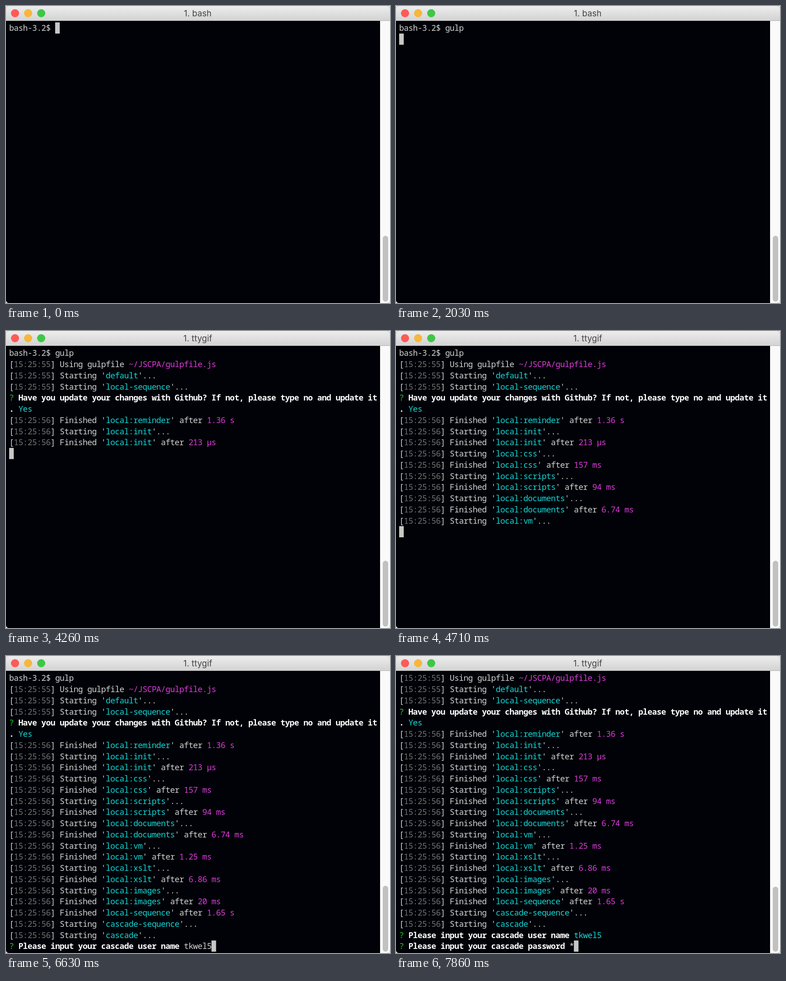
An HTML page with a canvas that plays this animation: 851 px wide and 658 px high, repeating every 8 s.

```html
<!DOCTYPE html>
<html lang="en">
<head>
<meta charset="utf-8">
<title>Terminal</title>
<style>
html, body { margin: 0; width: 100%; height: 100%; overflow: hidden; background: #fff; }
canvas { display: block; }
</style>
</head>
<body>
<canvas id="stage" width="851" height="658"></canvas>
<script>
const ctx = document.getElementById('stage').getContext('2d');
const W = 851, H = 658, LOOP = 8000;
const CELL = 10.19, ROW = 24.75, LEFT = 7, TOP = 36.3, ROWS = 25;
const FG = '#d2d2d2', GREY = '#727272', CYAN = '#14d6d6', PINK = '#dc3cda', GREEN = '#1ccb1c', WHITE = '#fff';
const SIZE = 18;
const MONO = SIZE + 'px "Noto Sans Mono", "DejaVu Sans Mono", monospace';
const TRACKING = CELL - 0.6 * SIZE + 'px';

// A line is a list of [text, colour] runs; white runs are bold.
const stamp = sec => [['[', FG], ['15:25:' + sec, GREY], ['] ', FG]];
const start = (task, sec = 56) =>
  [...stamp(sec), ["Starting '", FG], [task, CYAN], ["'...", FG]];
const finish = (task, time) =>
  [...stamp(56), ["Finished '", FG], [task, CYAN], ["' after ", FG], [time, PINK]];
const ask = text => [['? ', GREEN], [text + ' ', WHITE]];

const command = 'gulp', keyTimes = [810, 920, 1490, 1660];
const user = 'tkwel5', userTimes = [5940, 6040, 6130, 6230, 6390, 6630];
const typed = (text, times, t) => text.slice(0, times.filter(at => at <= t).length);

const question = ask('Have you update your changes with Github? If not, please type no and update it');
const intro = [
  [...stamp(55), ['Using gulpfile ', FG], ['~/JSCPA/gulpfile.js', PINK]],
  start('default', 55),
  start('local-sequence', 55)
];
const jobs = [
  ['init', '213 µs'], ['css', '157 ms'], ['scripts', '94 ms'], ['documents', '6.74 ms'],
  ['vm', '1.25 ms'], ['xslt', '6.86 ms'], ['images', '20 ms']
];
const log = [
  [['bash-3.2$ gulp', FG]],
  ...intro,
  question,
  [['. ', WHITE], ['Yes', CYAN]],
  finish('local:reminder', '1.36 s'),
  ...jobs.flatMap(([name, time]) => [start('local:' + name), finish('local:' + name, time)]),
  finish('local-sequence', '1.65 s'),
  start('cascade-sequence'),
  start('cascade')
];
// [time, number of log lines printed]
const progress = [
  [4160, 7], [4260, 9], [4360, 10], [4520, 12], [4615, 14], [4700, 16],
  [4790, 18], [4870, 20], [4960, 22], [5040, 24]
];

const length = line => line.reduce((n, [text]) => n + text.length, 0);

function screen(t) {
  let lines, cursor;
  if (t < 2030) {
    lines = [[['bash-3.2$ ' + typed(command, keyTimes, t), FG]]];
  } else if (t < 4160) {
    lines = [log[0]];
    if (t >= 2690) lines.push(intro[0]);
    if (t >= 2750) lines.push(...intro.slice(1), start('local:reminder', 55));
    if (t >= 2820) {
      lines.push(question, [['. ', WHITE], ['(y/N) ', GREY], [t >= 3880 ? 'y' : '', FG]]);
      cursor = t >= 3880 ? [9, 6] : [79, 5];
    } else {
      lines.push([]);
    }
  } else {
    lines = log.slice(0, progress.findLast(([at]) => at <= t)[1]);
    if (t >= 5130) {
      lines.push([...ask('Please input your cascade user name'),
        [typed(user, userTimes, t), t >= 6970 ? CYAN : FG]]);
    }
    if (t >= 7070) {
      lines.push([...ask('Please input your cascade password'), [t >= 7860 ? '*' : '', FG]]);
    } else if (t < 5130 || t >= 6970) {
      lines.push([]);
    }
  }
  cursor ??= [length(lines.at(-1)), lines.length - 1];
  return { lines, cursor };
}

function box(x, y, w, h, r, fill) {
  ctx.fillStyle = fill;
  ctx.beginPath();
  ctx.roundRect(x, y, w, h, r);
  ctx.fill();
}

function drawWindow(title, scrolled) {
  box(0, 0, W, H, 6, '#000207');
  box(829, 33, 22, 625, [0, 0, 6, 0], '#fafafa');
  const thumb = scrolled ? 511 : 509;
  box(835, thumb, 12, 655 - thumb, 6, '#c1c1c1');

  const bar = ctx.createLinearGradient(0, 0, 0, 33);
  bar.addColorStop(0, '#ededed');
  bar.addColorStop(1, '#d2d2d2');
  box(0, 0, W, 33, [6, 6, 0, 0], bar);
  box(0, 32, W, 1, 0, '#b0b0b0');
  ['#fc5b57', '#f6b73c', '#3ec746'].forEach((c, i) => box(11 + 29 * i, 7, 18, 18, 9, c));

  ctx.letterSpacing = '0px';
  ctx.font = '18.7px Inter, Roboto, sans-serif';
  ctx.textAlign = 'center';
  ctx.fillStyle = '#444';
  ctx.fillText(title, 425, 23);
}

function drawLine(line, row) {
  let col = 0;
  for (const [text, colour] of line) {
    ctx.font = (colour === WHITE ? 'bold ' : '') + MONO;
    ctx.fillStyle = colour;
    ctx.fillText(text, LEFT + col * CELL, TOP + row * ROW + 19);
    col += text.length;
  }
}

function draw(now) {
  const t = now % LOOP;
  const { lines, cursor: [col, row] } = screen(t);
  const scroll = Math.max(0, lines.length - ROWS);
  ctx.clearRect(0, 0, W, H);
  drawWindow(t < 4160 ? '1. bash' : '1. ttygif', scroll > 0);
  ctx.textAlign = 'left';
  ctx.letterSpacing = TRACKING;
  box(LEFT + col * CELL, TOP + (row - scroll) * ROW, CELL, ROW, 0, '#c7c7c7');
  lines.slice(scroll).forEach(drawLine);
}

const begin = performance.now();
function tick() {
  draw(performance.now() - begin);
  requestAnimationFrame(tick);
}
tick();
</script>
</body>
</html>
```
